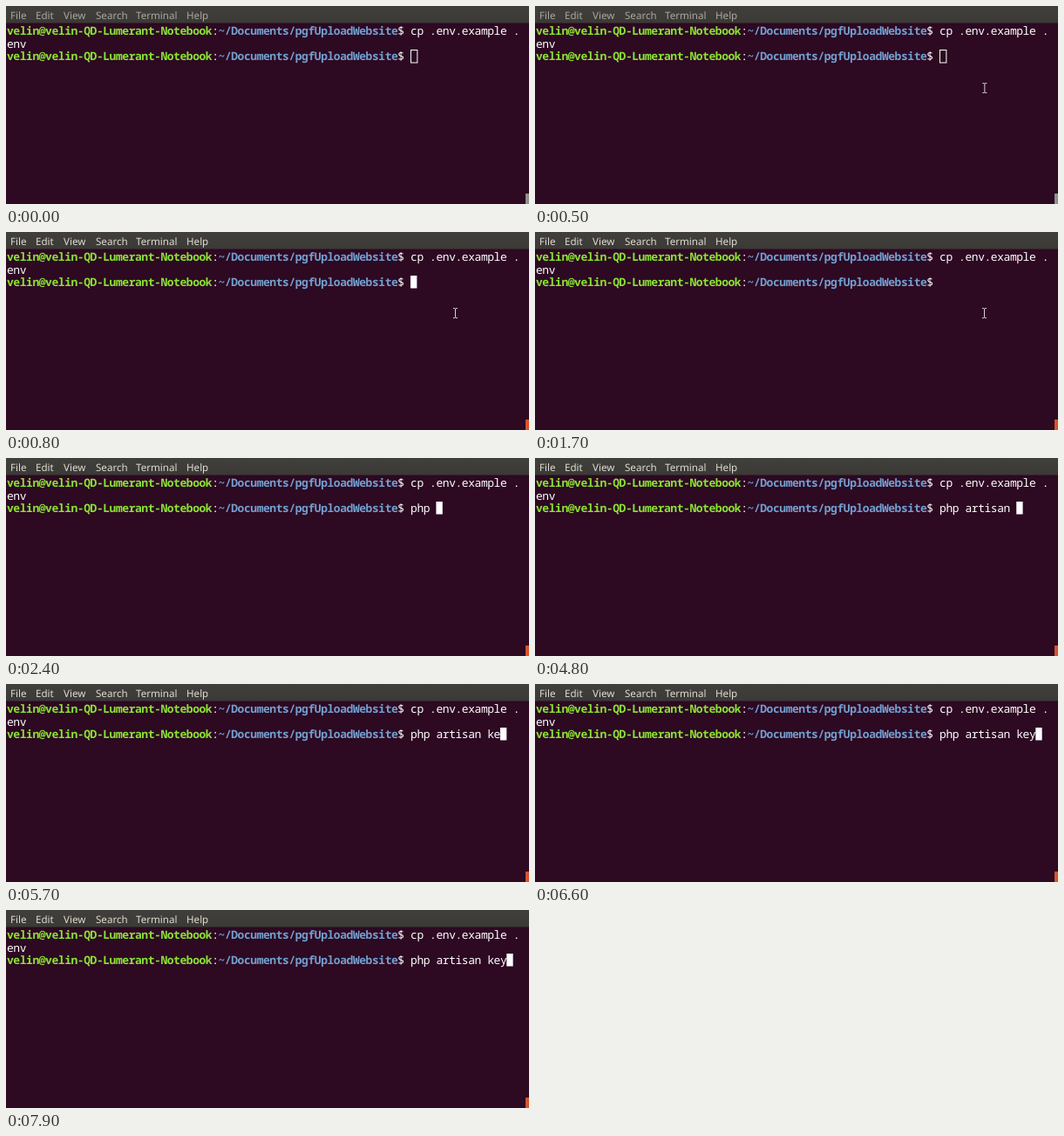
An HTML page for the animation above (8000 ms loop, 600 by 227 pixels).

```html
<!DOCTYPE html>
<html lang="en">
<head>
<meta charset="utf-8">
<title>Terminal</title>
<style>
  html, body { margin: 0; width: 100%; height: 100%; overflow: hidden; background: #2d0922; }
  svg { display: block; width: 100%; height: 100%; }
  text { white-space: pre; text-rendering: geometricPrecision; }
  #menu { font: 11.6px "Noto Sans", "Open Sans", sans-serif; }
  #term { font: 13px "Noto Sans Mono", "Liberation Mono", monospace; letter-spacing: -.45px; fill: #fff; }
  .user { font-weight: 700; fill: #8ae234; }
  .path { font-weight: 700; fill: #729fcf; }
</style>
</head>
<body>
<svg viewBox="0 0 600 227">
  <defs>
    <linearGradient id="bar" x2="0" y2="1">
      <stop stop-color="#413f3b"/>
      <stop offset="1" stop-color="#3b3a36"/>
    </linearGradient>
  </defs>
  <rect width="600" height="227" fill="#2d0922"/>
  <rect width="600" height="19.5" fill="url(#bar)"/>
  <g id="menu"></g>
  <g id="term"></g>
  <rect id="caret" y="50" height="14.5"/>
  <rect id="thumb" x="596" y="215" width="4" height="12"/>
  <path id="mouse" d="M-2.5-5.5H-.7L0-5 .7-5.5H2.5M0-5V5M-2.5 5.5H-.7L0 5 .7 5.5H2.5" fill="none" stroke="#d8d0d5"/>
</svg>
<script>
const LOOP = 8000, CELL = 7.35, LEFT = 1, BLINK = 600;
const ROWS = [33, 47.5, 62];
const FOCUS = 700;
const COMMAND = 'php artisan key';
const KEYS = [1800, 1900, 2100, 2300, 2500, 2700, 3000, 3200, 3300, 3400, 3600, 4800, 5300, 5700, 6500];
const USER = 'velin@velin-QD-Lumerant-Notebook';
const PATH = '~/Documents/pgfUploadWebsite';
const START = USER.length + PATH.length + 3;

const $ = id => document.getElementById(id);
const colX = col => LEFT + col * CELL;

function set(el, attrs) {
  for (const name in attrs) el.setAttribute(name, attrs[name]);
}

function addText(parent, x, y, content, cls = '') {
  const el = document.createElementNS('http://www.w3.org/2000/svg', 'text');
  set(el, { x, y, class: cls });
  el.textContent = content;
  return parent.appendChild(el);
}

function addPrompt(y) {
  const pathCol = USER.length + 1;
  addText($('term'), colX(0), y, USER, 'user');
  addText($('term'), colX(USER.length), y, ':');
  addText($('term'), colX(pathCol), y, PATH, 'path');
  addText($('term'), colX(pathCol + PATH.length), y, '$');
}

const items = { File: 5, Edit: 34, View: 66, Search: 103, Terminal: 149, Help: 207 };
for (const name in items) addText($('menu'), items[name], 14.5, name);
addPrompt(ROWS[0]);
addText($('term'), colX(START), ROWS[0], 'cp .env.example .');
addText($('term'), colX(0), ROWS[1], 'env');
addPrompt(ROWS[2]);
const typed = addText($('term'), colX(START), ROWS[2], '');

function draw(t) {
  const focused = t >= FOCUS;
  const count = KEYS.filter(k => k <= t).length;
  const x = colX(START + count);
  typed.textContent = COMMAND.slice(0, count);

  // Each key press restarts the blink with the caret lit.
  const since = t - (count ? KEYS[count - 1] : FOCUS);
  const lit = !focused || Math.floor(since / BLINK) % 2 === 0;
  set($('caret'), focused
    ? { x, y: 50, width: CELL, height: 14.5, fill: '#fff', stroke: 'none' }
    : { x: x + .5, y: 50.5, width: CELL, height: 14.5, fill: 'none', stroke: '#fff' });
  $('caret').style.visibility = lit ? 'visible' : 'hidden';

  set($('menu'), { fill: focused ? '#dfdbd2' : '#aaa79f' });
  set($('thumb'), { fill: focused ? '#d6552f' : '#948f8d' });

  // The pointer glides in and hides at the first key press.
  const p = Math.min(1, Math.max(0, (t - 100) / 500));
  const rest = (1 - p) ** 3;
  set($('mouse'), { transform: `translate(${515.5 + 50 * rest} ${93 + 134 * rest})` });
  $('mouse').style.visibility = t >= 100 && !count ? 'visible' : 'hidden';
}

function tick() {
  draw(performance.now() % LOOP);
  requestAnimationFrame(tick);
}
tick();
</script>
</body>
</html>
```
